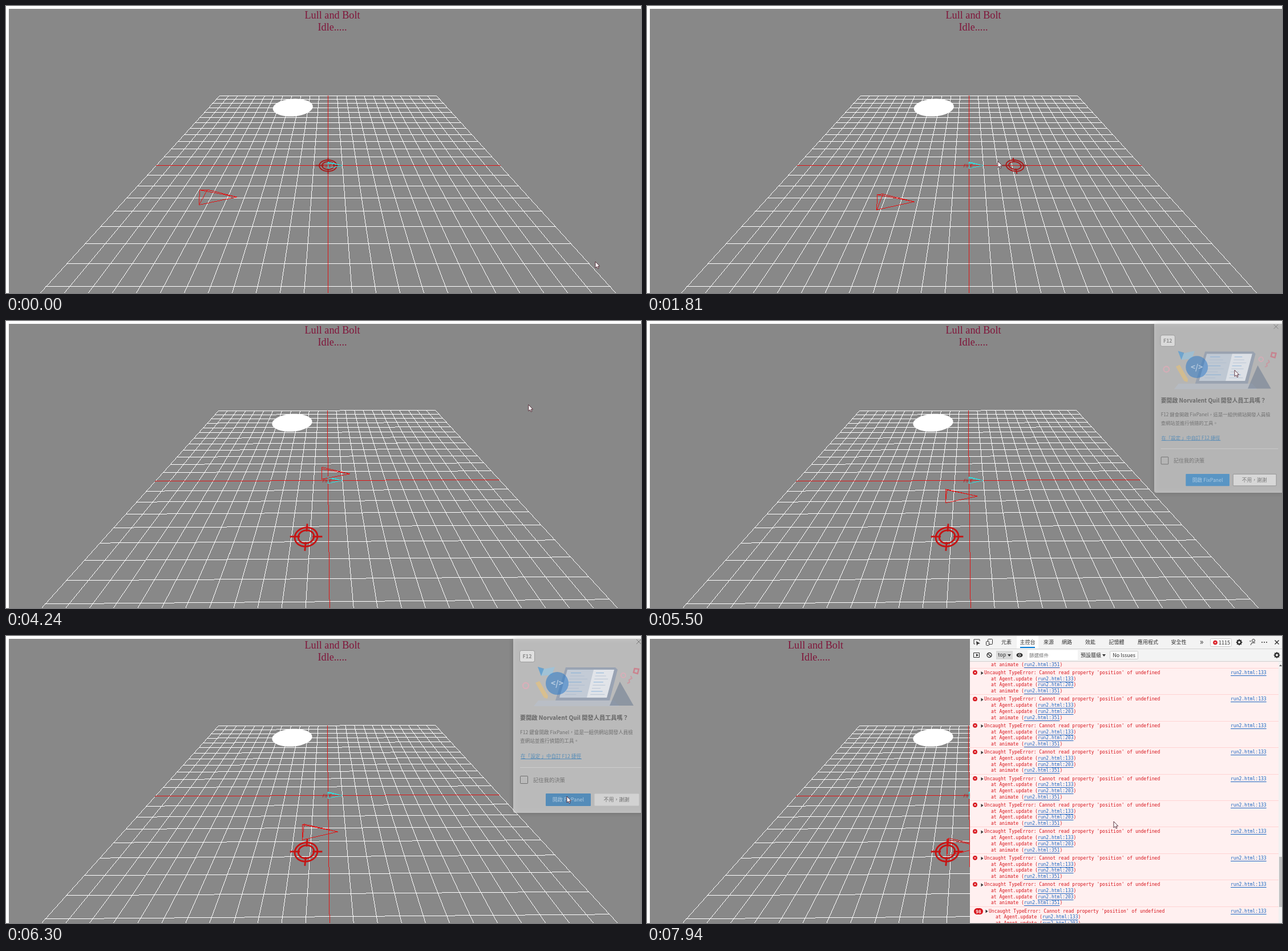
Animation, 1113 px wide and 503 px high, one loop 8000 ms. Source, as an HTML page with a canvas:

```html
<!DOCTYPE html>
<html lang="zh-Hant">
<head>
<meta charset="utf-8">
<title>Lull and Bolt</title>
<style>
html, body { margin: 0; width: 100%; height: 100%; overflow: hidden; background: #fff; }
canvas { display: block; }
</style>
</head>
<body>
<canvas id="stage" width="1113" height="503"></canvas>
<script>
const W = 1113, H = 503, LOOP = 8000, PANEL_X = 566;
const ctx = document.getElementById('stage').getContext('2d');
const SERIF = '"Liberation Serif", serif';
const SANS = '"Noto Sans CJK TC", "Noto Sans CJK", "Noto Sans", sans-serif';
const MONO = '"DejaVu Sans Mono", monospace';
const RED = '#e01414', LINK = '#1a66c2', ERROR = '#d8141c';

// Keys are [time, x, y]; each axis follows a monotone cubic.
const agentKeys = [
  [0, -7.45, 2.93], [900, -7.45, 2.93], [1300, -6.9, 3.12], [1670, -5.77, 3.28],
  [1810, -5.22, 3.295], [2510, -2.98, 2.86], [3000, -1.4, 1.5], [3380, -.45, .1],
  [3850, -.1, -1], [4240, -.45, -.74], [5100, -1.28, .37], [5500, -1.467, 1.57],
  [5900, -1.52, 2.7], [6300, -1.449, 3.295], [6690, -1.34, 3.77], [7940, -1.17, 4.365]];
const targetKeys = [
  [0, 0, 0], [880, 0, 0], [1150, -.3, 4.85], [1550, 3.2, 0], [2650, 3.2, 0],
  [3200, .4, -1.3], [3480, .4, -1.3], [3850, -1.18, 4.69], [8000, -1.18, 4.69]];
const cursorKeys = [
  [0, 1033, 448], [100, 1033, 448], [780, 566, 274], [880, 566, 276], [1150, 556, 380],
  [1550, 636, 278], [1810, 615, 272], [2300, 610, 247], [2650, 638, 274],
  [3200, 574, 258], [3480, 574, 258], [3850, 526, 375], [4240, 915.5, 147],
  [4800, 1021, 40], [5100, 1015, 58], [5500, 1030, 86], [6150, 983, 281],
  [6350, 983, 281], [6690, 980, 337], [7940, 818, 325]];

function track(keys, t) {
  let i = 0;
  while (i < keys.length - 2 && t > keys[i + 1][0]) i++;
  const span = keys[i + 1][0] - keys[i][0];
  const u = Math.min(1, (t - keys[i][0]) / span);
  return [1, 2].map(axis => {
    const slope = k => k < 0 || k > keys.length - 2 ? 0
      : (keys[k + 1][axis] - keys[k][axis]) / (keys[k + 1][0] - keys[k][0]);
    const tangent = k => {
      const a = slope(k - 1), b = slope(k);
      return a * b > 0 ? 2 * a * b / (a + b) : 0;
    };
    const p = keys[i][axis], q = keys[i + 1][axis], v = 1 - u;
    return p * v * v * (1 + 2 * u) + q * u * u * (3 - 2 * u)
      + span * (tangent(i) * u * v * v - tangent(i + 1) * u * u * v);
  });
}

const ramp = (t, from, to) => Math.max(0, Math.min(1, (t - from) / (to - from)));

// Perspective of a point x right, z towards the viewer, h above the ground.
function project(x, z, h = 0) {
  const w = 1 - .0488 * z - .025 * h;
  return [564.5 + 25.125 * x / w, -52 + (331.5 - 19.9 * h) / w];
}
function rotated(x, z, angle, h = 0) {
  const c = Math.cos(angle), s = Math.sin(angle);
  return project(x * c + z * s, z * c - x * s, h);
}

// Hard-edged one-pixel line.
function pixelLine(g, [x0, y0], [x1, y1], color) {
  const n = Math.ceil(Math.max(Math.abs(x1 - x0), Math.abs(y1 - y0))) || 1;
  g.fillStyle = color;
  for (let i = 0; i <= n; i++) {
    const y = Math.floor(y0 + (y1 - y0) * i / n);
    if (y > H) continue;
    g.fillRect(Math.floor(x0 + (x1 - x0) * i / n), y, 1, 1);
  }
}

const gridCanvas = Object.assign(document.createElement('canvas'), { width: W, height: H });
let gridAngle = null;
function drawGrid(angle) {
  if (angle !== gridAngle) {
    gridAngle = angle;
    const g = gridCanvas.getContext('2d');
    g.clearRect(0, 0, W, H);
    for (const center of [false, true])
      for (let k = -12; k <= 12; k++) {
        if ((k === 0) !== center) continue;
        const color = center ? RED : '#fff';
        pixelLine(g, rotated(k, -12, angle), rotated(k, 12, angle), color);
        pixelLine(g, rotated(-12, k, angle), rotated(12, k, angle), color);
      }
  }
  ctx.drawImage(gridCanvas, 0, 0);
}

function drawCone(x, z, size, color) {
  const corners = [project(x, z, size), project(x, z + .6 * size),
    project(x, z - .6 * size), project(x + 2 * size, z)];
  corners.forEach((p, i) => corners.slice(i + 1).forEach(q => pixelLine(ctx, p, q, color)));
}

function circlePath(x, z, r, angle = 0) {
  ctx.beginPath();
  for (let a = 0; a < 48; a++)
    ctx.lineTo(...rotated(x + r * Math.cos(a * Math.PI / 24), z + r * Math.sin(a * Math.PI / 24), angle));
  ctx.closePath();
}

function drawTarget(x, z) {
  const scale = 1 / (1 - .0488 * z);
  ctx.strokeStyle = z > 2 ? '#c61414' : '#a81919';
  ctx.lineWidth = 1.9 * scale ** 1.6;
  circlePath(x, z, .61);
  ctx.stroke();
  circlePath(x, z, .42);
  ctx.stroke();
  for (const [dx, dz] of [[1, 0], [-1, 0], [0, 1], [0, -1]]) {
    ctx.beginPath();
    ctx.moveTo(...project(x + dx * .34, z + dz * .34));
    ctx.lineTo(...project(x + dx * .87, z + dz * .87));
    ctx.stroke();
  }
}

function text(s, x, y, font, color, align = 'left') {
  ctx.font = font;
  ctx.fillStyle = color;
  ctx.textAlign = align;
  ctx.textBaseline = 'middle';
  ctx.fillText(s, x, y);
}
function box(x, y, w, h, fill, stroke, radius = 0) {
  ctx.beginPath();
  ctx.roundRect(x, y, w, h, radius);
  if (fill) { ctx.fillStyle = fill; ctx.fill(); }
  if (stroke) { ctx.strokeStyle = stroke; ctx.lineWidth = 1; ctx.stroke(); }
}
function shape(points, fill, stroke, width = 1) {
  ctx.beginPath();
  points.forEach(p => ctx.lineTo(...p));
  if (fill) { ctx.closePath(); ctx.fillStyle = fill; ctx.fill(); }
  if (stroke) { ctx.strokeStyle = stroke; ctx.lineWidth = width; ctx.stroke(); }
}
function disc(x, y, r, fill, stroke, width = 1) {
  ctx.beginPath();
  ctx.arc(x, y, r, 0, 7);
  if (fill) { ctx.fillStyle = fill; ctx.fill(); }
  if (stroke) { ctx.strokeStyle = stroke; ctx.lineWidth = width; ctx.stroke(); }
}
function cross(x, y, r, color, width = 1) {
  shape([[x - r, y - r], [x + r, y + r]], null, color, width);
  shape([[x + r, y - r], [x - r, y + r]], null, color, width);
}

function drawScene(t) {
  ctx.fillStyle = '#888';
  ctx.fillRect(5, 5, W, H);
  const angle = .0077 * ramp(t, 3560, 3800);
  drawGrid(angle);
  circlePath(-3.54, -9.17, 2, angle);
  ctx.fillStyle = '#fff';
  ctx.fill();
  text('FIRE', 554, 280, 'italic 8px ' + SANS, '#b41c1c');
  drawTarget(...track(targetKeys, t));
  drawCone(0, 0, .5, '#2ee0e0');
  drawCone(...track(agentKeys, t), 1, RED);
}

function drawIllustration() {
  shape([[925, 123], [933, 113], [1066, 113], [1075, 123]], '#b9c2d0');
  shape([[1076, 80], [1100, 122], [1058, 122]], '#68788f');
  shape([[981, 55], [1068, 55], [1072, 59], [1058, 113], [963, 113]], '#7f91ad');
  shape([[984, 59], [1066, 59], [1053, 108], [970, 108]], '#e6edf5');
  shape([[1030, 59], [1066, 59], [1053, 108], [1018, 108]], '#fafafa');
  for (let i = 0; i < 8; i++) {
    const y = 64 + i * 5.4, x = 990 - i * 1.4;
    ctx.fillStyle = i % 3 ? '#a9b9cc' : '#6ba3d6';
    ctx.fillRect(x, y, 18 + i * 7 % 16, 1.3);
    ctx.fillRect(x + 44, y, 14 + i * 5 % 12, 1.3);
  }
  shape([[932, 54], [942, 58], [962, 54], [957, 68], [938, 70]], '#8cc8ec');
  shape([[932, 54], [943, 57], [938, 70]], '#3d8bcb');
  shape([[928, 82], [935, 79], [950, 105], [949, 110], [943, 108]], '#f0c36b');
  disc(966, 83, 20, '#2878c8');
  text('</>', 966, 83, 'bold 14px ' + SANS, '#fff', 'center');
  disc(911, 87, 5, null, '#f2a6b8', 2.5);
  disc(1082, 69, 4, null, '#f2a6b8', 2);
  shape([[1101, 57], [1109, 58], [1107, 66], [1100, 64], [1102, 56]], null, '#d9546a', 2.5);
  shape([[1089, 83], [1093, 81], [1092, 77], [1097, 74], [1095, 70]], null, '#d9808e', 2);
}

function drawDialog(t) {
  const shown = ramp(t, 5390, 5610), alpha = shown * (1 - ramp(t, 6220, 6400));
  if (!alpha) return;
  const pressed = t > 6150, scale = .94 + .06 * shown, label = '9px ' + SANS;
  ctx.save();
  ctx.globalAlpha = alpha;
  ctx.translate(889, 5);
  ctx.scale(scale, scale);
  ctx.translate(-889, -5);
  ctx.shadowColor = 'rgba(0,0,0,.35)';
  ctx.shadowBlur = 8;
  box(889, 5, 260, 305, '#f9f9f9', null, [0, 0, 0, 4]);
  ctx.shadowColor = 'transparent';
  cross(1109, 10, 4, '#444');
  box(900.5, 25.5, 26, 20, '#fff', '#777', 3);
  text('F12', 913.5, 36, 'bold 9px ' + SANS, '#444', 'center');
  drawIllustration();
  text('要開啟 Norvalent Quil 開發人員工具嗎？', 901, 143.5, 'bold 10.2px ' + SANS, '#222');
  const body = '8.6px ' + SANS;
  text('F12 鍵會開啟 FixPanel，這是一組供網站開發人員檢', 901, 169, body, '#333');
  text('查網站並進行偵錯的工具。', 901, 184, body, '#333');
  text('在「設定 」中自訂 F12 捷徑', 902, 210.5, body, '#0067b8');
  ctx.fillRect(902, 215, 107, 1);
  ctx.fillStyle = '#ddd';
  ctx.fillRect(901, 230, 212, 1);
  box(901.5, 245.5, 13, 13, null, '#333', 1);
  text('記住我的決策', 924, 252, '9.3px ' + SANS, '#333');
  box(946, 276, 79, 22, pressed ? '#0067b8' : '#0078d4', null, 1);
  text('開啟 FixPanel', 985.5, 287, label, '#fff', 'center');
  box(1031.5, 276.5, 78, 21, pressed ? '#e5e5e5' : '#f9f9f9', pressed ? null : '#666', 1);
  text('不用，謝謝', 1070, 287, label, '#222', 'center');
  ctx.restore();
}

function drawGear(x, y) {
  disc(x, y, 3.2, null, '#333', 2.4);
  for (let a = 0; a < 8; a++) {
    const c = Math.cos(a * Math.PI / 4), s = Math.sin(a * Math.PI / 4);
    shape([[x + 3 * c, y + 3 * s], [x + 5.3 * c, y + 5.3 * s]], null, '#333', 2);
  }
}

function drawToolbar(errors) {
  const font = '9px ' + SANS, ink = '#333';
  ctx.fillStyle = '#f3f3f3';
  ctx.fillRect(PANEL_X, 0, W, 44);
  ctx.fillStyle = '#fff';
  ctx.fillRect(648, 0, 38, 22);
  ctx.fillStyle = '#d0d0d0';
  ctx.fillRect(PANEL_X, 22, W, 1);
  ctx.fillRect(PANEL_X, 44, W, 1);
  ctx.fillStyle = '#0078d4';
  ctx.fillRect(654, 19, 26, 2);

  shape([[575, 14], [573, 14], [573, 6], [583, 6], [583, 9]], null, ink);
  shape([[577, 9], [584, 13], [580, 14], [578, 17]], ink);
  box(597.5, 5.5, 8, 9, null, ink, 1);
  box(594.5, 9.5, 5, 7, '#f3f3f3', ink, 1);
  const tabs = { 元素: 630, 主控台: 667, 來源: 704, 網路: 736, 效能: 777, 記憶體: 823, 應用程式: 878, 安全性: 932 };
  for (const [name, x] of Object.entries(tabs)) text(name, x, 11, font, ink, 'center');
  text('»', 972, 10, '14px ' + SANS, ink, 'center');
  box(987.5, 4.5, 37, 14, '#f9f9f9', '#ccc', 2);
  disc(996, 11.5, 3.8, ERROR);
  cross(996, 11.5, 1.4, '#fff');
  text(errors, 1002, 11.5, font, ink);
  drawGear(1038, 11);
  disc(1063, 8, 2.5, null, ink);
  shape([[1056, 9], [1059, 9]], null, ink);
  shape([[1058, 16], [1060, 12], [1066, 12]], null, ink);
  for (const x of [1078, 1082, 1086]) disc(x, 11, 1, ink);
  cross(1104, 11, 3.5, ink, 1.4);

  box(572.5, 29.5, 10, 8, null, ink);
  shape([[577, 31], [581, 33.5], [577, 36]], ink);
  disc(600, 33.5, 4, null, ink, 1.4);
  shape([[597, 31], [603, 36]], null, ink, 1.4);
  box(612, 26, 29, 15, '#d9d9d9');
  text('top', 615, 33, font, ink);
  shape([[632, 32], [638, 32], [635, 36]], ink);
  ctx.beginPath();
  ctx.ellipse(653, 33.5, 5.5, 3.8, 0, 0, 7);
  ctx.fillStyle = ink;
  ctx.fill();
  disc(653, 33.5, 1.8, ink, '#fff');
  box(667, 25, 88, 17, '#fff');
  text('篩選條件', 670, 33.5, '8.5px ' + SANS, '#777');
  text('預設層級', 760, 33.5, font, ink);
  shape([[798, 32], [804, 32], [801, 36]], ink);
  box(811.5, 26.5, 49, 14, '#f9f9f9', '#ccc', 1);
  text('No Issues', 836, 33.5, font, ink, 'center');
  drawGear(1104, 33.5);
}

function link(s, x, y) {
  text(s, x, y, '8px ' + MONO, LINK);
  ctx.fillRect(x, Math.round(y + 4), ctx.measureText(s).width, 1);
}
function callSite(name, line, x, y) {
  const font = '8px ' + MONO, lead = `at ${name} (`;
  text(lead, x, y, font, ERROR);
  const start = x + ctx.measureText(lead).width, place = 'run2.html:' + line;
  const end = start + ctx.measureText(place).width;
  link(place, start, y);
  text(')', end, y, font, ERROR);
}

function drawErrors(repeats) {
  ctx.fillStyle = '#fff0f0';
  ctx.fillRect(PANEL_X, 45, 541, H);
  callSite('animate', 351, 603, 50.5);
  for (let row = 0; row < 10; row++) {
    const y = 65 + row * 46.4, last = row === 9, shift = last ? 8 : 0;
    ctx.fillStyle = '#ffd3d3';
    ctx.fillRect(PANEL_X, Math.round(y - 9), 541, 1);
    if (last) {
      box(573, y - 5.5, 16, 11, ERROR, null, 5.5);
      text(repeats, 581, y, 'bold 8px ' + SANS, '#fff', 'center');
    } else {
      disc(575, y - 1, 3.9, ERROR);
      cross(575, y - 1, 1.4, '#fff');
    }
    shape([[585.5 + shift, y - 3], [589.5 + shift, y], [585.5 + shift, y + 3]], '#333');
    text("Uncaught TypeError: Cannot read property 'position' of undefined", 591 + shift, y, '8px ' + MONO, ERROR);
    link('run2.html:133', 1023, y);
    callSite('Agent.update', 133, 603 + shift, y + 10.7);
    callSite('Agent.update', 203, 603 + shift, y + 21.4);
    callSite('animate', 351, 603 + shift, y + 32.1);
  }
  ctx.fillStyle = '#f1f1f1';
  ctx.fillRect(1107, 45, 6, H);
  ctx.fillStyle = '#c1c1c1';
  ctx.fillRect(1108, 387, 5, 88);
  shape([[1108, 53], [1110.5, 50], [1113, 53]], '#555');
}

function drawPanel(t) {
  ctx.fillStyle = '#fff';
  ctx.fillRect(PANEL_X, 0, W, H);
  const missing = Math.round((7940 - t) * .06);
  if (t >= 6860) drawToolbar(1115 - missing);
  if (t >= 7100) drawErrors(98 - missing);
}

function drawCursor(x, y) {
  const outline = [[0, 0], [0, 11], [2.6, 8.8], [4.3, 12.4], [6, 11.7], [4.4, 8.2], [7.6, 8]];
  shape([...outline, [0, 0]].map(([dx, dy]) => [x + dx, y + dy]), '#fff', '#4a1c2a', .9);
}

function draw(now) {
  const t = now % LOOP, docked = t >= 6560;
  ctx.fillStyle = '#fff';
  ctx.fillRect(0, 0, W, H);
  drawScene(t);
  const middle = docked ? 295.5 : 572;
  text('Lull and Bolt', middle, 17.5, '18.2px ' + SERIF, '#80153a', 'center');
  text('Idle.....', middle, 38.5, '18.2px ' + SERIF, '#80153a', 'center');
  if (docked) drawPanel(t);
  else drawDialog(t);
  drawCursor(...track(cursorKeys, t));
}

const start = performance.now();
function tick() {
  draw(performance.now() - start);
  requestAnimationFrame(tick);
}
tick();
</script>
</body>
</html>
```
